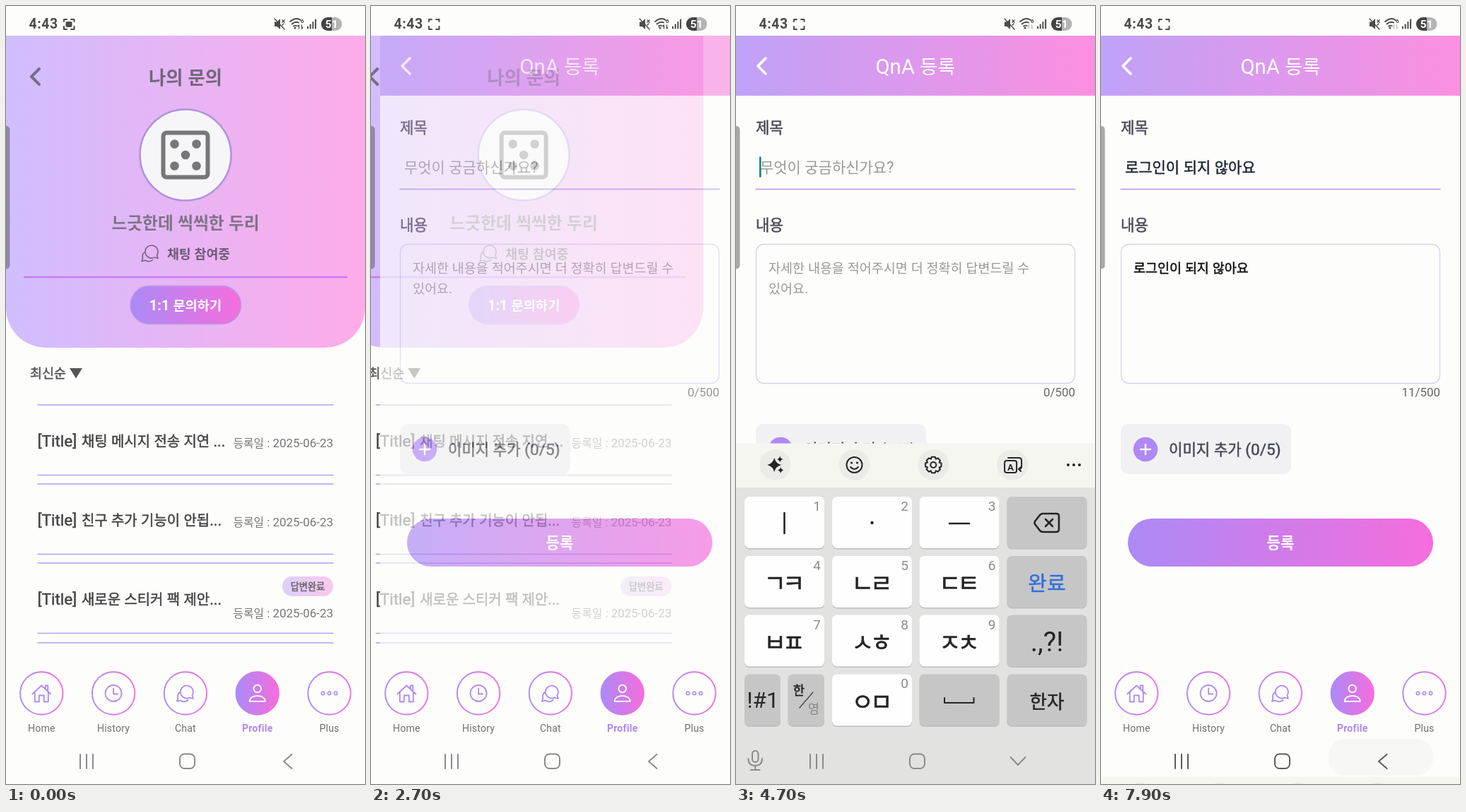
Animation, 508 px wide and 1102 px high, one loop 8000 ms. Source, as an HTML page:

```html
<!DOCTYPE html>
<html lang="ko">
<head>
<meta charset="utf-8">
<title>문의 등록</title>
<style>
html, body { margin: 0; width: 100%; height: 100%; overflow: hidden; background: #fdfdfc; }
svg { display: block; width: 100%; height: 100%; }
text { font-family: Roboto, "Noto Sans CJK KR", "Noto Sans CJK JP", sans-serif; white-space: pre; stroke-width: 0; }
.hangul { font-size: .935em; }
.medium { stroke-width: .5; }
.jamo { stroke-width: .6; letter-spacing: -5px; }
.line { fill: none; stroke-linecap: round; stroke-linejoin: round; }
</style>
</head>
<body>
<svg id="stage" viewBox="0 0 508 1102"></svg>
<script>
const LOOP = 8000;
const PAPER = '#fdfdfc', VIOLET = '#b088f4', MESSAGE = '로그인이 되지 않아요';

// Markup helpers
const text = (x, y, size, content, fill = '#555', extra = '') =>
  `<text x="${x}" y="${y}" font-size="${size}" fill="${fill}" stroke="${fill}" ${extra}>${
    content.replace(/[ㄱ-ㅣ가-힣]+/g, run => `<tspan class="hangul">${run}</tspan>`)}</text>`;
const MID = 'text-anchor="middle"', END = 'text-anchor="end"';
const BOLD = 'font-weight="700"', MEDIUM = 'class="medium"';
const rect = (x, y, w, h, r, fill, extra = '') =>
  `<rect x="${x}" y="${y}" width="${w}" height="${h}" rx="${r}" fill="${fill}" ${extra}/>`;
const circle = (x, y, r, fill, extra = '') => `<circle cx="${x}" cy="${y}" r="${r}" fill="${fill}" ${extra}/>`;
const line = (d, stroke, width = 2, extra = '') =>
  `<path class="line" d="${d}" stroke="${stroke}" stroke-width="${width}" ${extra}/>`;
const group = (content, id = '', x = 0, y = 0) =>
  `<g ${id && `id="${id}"`} transform="translate(${x} ${y})">${content}</g>`;
const gradient = (id, from, to) => `<linearGradient id="${id}">
  <stop stop-color="${from}"/><stop offset="1" stop-color="${to}"/></linearGradient>`;

const CHAT = 'M11 7.5L6 6.1A9 9 0 1 1 9.6 2.8Z' +
  'M-8.5 -1A8 8 0 0 0 -10.5 7L-12 11.5L-7 10.2A8 8 0 0 0 3.5 9.5';

function inquiryList() {
  const dots = [[-15.5, -15.5], [15.5, -15.5], [0, 0], [-15.5, 15.5], [15.5, 15.5]];
  const rows = ['채팅 메시지 전송 지연 ...', '친구 추가 기능이 안됩...', '새로운 스티커 팩 제안...'];
  return rect(0, 42, 508, 1060, 0, PAPER) +
    '<path d="M0 42H508V427.5A56.4 56.4 0 0 1 451.6 483.9H56.4A56.4 56.4 0 0 1 0 427.5Z" fill="url(#soft)"/>' +
    line('M47 89L36 100L47 111', '#786c88', 4) +
    text(254, 111, 28.2, '나의 문의', '#716779', `${MID} ${BOLD}`) +
    circle(254, 211, 64.5, '#f6f6f9', 'stroke="#b092de" stroke-width="2.6"') +
    rect(222.5, 179.5, 63, 63, 5, 'none', 'stroke="#777" stroke-width="6"') +
    dots.map(([x, y]) => circle(254 + x, 211 + y, 6.3, '#777')).join('') +
    text(254, 316, 25.4, '느긋한데 씩씩한 두리', '#7d7386', `${MID} ${BOLD}`) +
    group(line(CHAT, '#75627f', 1.6), '', 204, 350) +
    text(228, 358, 19.6, '채팅 참여중', '#6d5c76', BOLD) +
    line('M26 384H482', '#c87af6', 2.4) +
    rect(176, 396.5, 156.5, 54, 27, 'url(#strong)', 'stroke="#bb97e6" stroke-width="1.4"') +
    text(254, 431, 20, '1:1 문의하기', '#fff', `${MID} ${BOLD}`) +
    text(34, 527, 19.76, '최신순', '#555', MEDIUM) +
    '<path d="M90 513H108L99 527.5Z" fill="#555"/>' +
    rows.map((title, i) => {
      const top = 565 + 112 * i, answered = i === 2;
      return line(`M45 ${top}H463M45 ${top + 99.5}H463`, '#b3a0f3', 1.4) +
        text(44.5, top + 59, 22.6, '[Title]', '#444', MEDIUM) +
        text(107, top + 59, 21.35, title, '#444', MEDIUM) +
        text(463, top + (answered ? 76.5 : 60), 16.93, '등록일 : 2025-06-23', '#777', END);
    }).join('') +
    line('M45 902H463', '#b3a0f3', 1.4) +
    rect(391, 808, 72, 28, 14, 'url(#badge)') +
    text(427, 827, 14.1, '답변완료', '#666', `${MID} ${MEDIUM}`);
}

function questionForm() {
  return rect(0, 42, 508, 1060, 0, PAPER) +
    rect(0, 42, 508, 85, 0, 'url(#header)') +
    line('M42 74L31 85L42 96', '#fff', 3.6) +
    text(254, 96, 29.3, 'QnA 등록', '#fff', MID) +
    text(28, 180, 22.58, '제목', '#4a4a55', MEDIUM) +
    text(34, 236, 22.4, '무엇이 궁금하신가요?', '#999', 'id="titleHint"') +
    text(34, 236, 22.4, MESSAGE, '#1f2937', `id="titleText" ${MEDIUM}`) +
    line('M28 259.5H480', '#b395f0', 1.6) +
    text(28, 318, 22.58, '내용', '#4a4a55', MEDIUM) +
    rect(28.5, 337.5, 451, 197, 11, 'none', 'stroke="#d9d1ee" stroke-width="1.3"') +
    `<g id="bodyHint">${text(46, 378, 19.76, '자세한 내용을 적어주시면 더 정확히 답변드릴 수', '#999')}
      ${text(46, 407, 19.76, '있어요.', '#999')}</g>` +
    text(46, 378, 19.76, MESSAGE, '#111', `id="bodyText" ${MEDIUM}`) +
    text(480, 553, 16.93, '', '#666', `id="counter" ${END}`) +
    rect(28, 592, 241, 71, 11, '#f1f1f3') +
    circle(63, 628, 17.3, VIOLET) + line('M56 628H70M63 621V635', '#fff', 2.4) +
    text(96, 636, 22.58, '이미지 추가 (0/5)', '#454a55', MEDIUM) +
    rect(38, 726, 432, 68, 34, 'url(#strong)') +
    text(254, 768, 22.58, '등록', '#fff', `${MID} ${BOLD}`) +
    rect(0, 0, 2.6, 29, 0, '#148571', 'id="caret"');
}

function tabBar() {
  const icons = [
    ['Home', c => line('M-13 1L0 -11L13 1M-9.5 -2V12H-3.5V3H3.5V12H9.5V-2M5.5 -7V-11H9V-4', c, 1.8)],
    ['History', c => circle(0, 0, 11.5, 'none', `stroke="${c}" stroke-width="1.8"`) + line('M0 -7V1H6', c, 1.8)],
    ['Chat', c => line(CHAT, c, 1.8)],
    ['Profile', c => circle(0, -6.5, 5.3, 'none', `stroke="${c}" stroke-width="1.8"`) +
      line('M-11 11.5C-11 1 11 1 11 11.5Z', c, 1.8)],
    ['Plus', c => [-9, 0, 9].map(x => circle(x, 0, 2.2, 'none', `stroke="${c}" stroke-width="1.6"`)).join('')],
  ];
  return rect(0, 910, 508, 192, 0, PAPER) + icons.map(([label, icon], i) => {
    const active = label === 'Profile';
    return group(
      circle(0, 0, 30.2, active ? 'url(#strong)' : 'none', 'stroke="url(#strong)" stroke-width="1.9"') +
      icon(active ? '#fff' : VIOLET) +
      text(0, 54.5, 14.1, label, active ? VIOLET : '#707070',
        `${MID} letter-spacing=".2" ${active ? BOLD : ''}`), '', 50.3 + 101.8 * i, 973.5);
  }).join('');
}

function keyboard() {
  const INK = '#252525';
  const columns = [12, 136, 259.5, 383.5], rows = [695, 779, 862.5, 946.5];
  const key = (x, y, w, fill) => rect(x, y + 1.5, w, 73, 7, '#bdbdbd') + rect(x, y, w, 73, 7, fill);
  const label = (col, row, size, content, fill = INK, extra = '') =>
    text(columns[col] + 56.5, rows[row] + 37.5 + size * .37, size, content, fill, `${MID} ${extra}`);
  const JAMO = 'class="jamo" dx="-2.5"';
  const jamo = ['', '', '', 'ㄱㅋ', 'ㄴㄹ', 'ㄷㅌ', 'ㅂㅍ', 'ㅅㅎ', 'ㅈㅊ'];
  const letterKeys = jamo.map((content, i) => {
    const col = i % 3, row = Math.floor(i / 3);
    return key(columns[col], rows[row], 113, '#fefefe') + label(col, row, 36.5, content, INK, JAMO) +
      text(columns[col] + 108, rows[row] + 20, 19, String(i + 1), '#8c8c8c', END);
  }).join('');
  const gear = Array.from({ length: 8 }, (_, i) => {
    const at = (r, a) => `${(r * Math.cos(a)).toFixed(1)} ${(r * Math.sin(a)).toFixed(1)}`;
    const a = i * Math.PI / 4;
    return `${i ? 'L' : 'M'}${at(11.5, a - .22)}L${at(11.5, a + .22)}L${at(9, a + .4)}`;
  }).join('') + 'Z';
  const spark = (x, y, r) => `<path fill="${INK}" d="M${x} ${y - r}Q${x + r * .2} ${y - r * .2} ${x + r} ${y}` +
    `Q${x + r * .2} ${y + r * .2} ${x} ${y + r}Q${x - r * .2} ${y + r * .2} ${x - r} ${y}` +
    `Q${x - r * .2} ${y - r * .2} ${x} ${y - r}Z"/>`;
  const tools = [
    spark(-1.5, 0, 10) + spark(6.5, -8, 4.5) + spark(7.5, 7.5, 4.5),
    circle(0, 0, 11, 'none', `stroke="${INK}" stroke-width="2"`) + circle(-4, -3, 1.6, INK) +
      circle(4, -3, 1.6, INK) + line('M-5.5 3Q0 9 5.5 3', INK),
    line(gear, INK) + circle(0, 0, 4, 'none', `stroke="${INK}" stroke-width="2"`),
    rect(-11, -6, 17, 17, 3, 'none', `stroke="${INK}" stroke-width="2"`) +
      line('M-6 -10H9Q13 -10 13 -6V2Q13 6 9 6', INK) + line('M12 3L9 6L12 9', INK) +
      text(-2.5, 7.5, 13.5, 'A', INK, `${MID} ${BOLD}`),
  ];
  return rect(0, 619.5, 508, 490, 0, '#f6f6f1') + rect(0, 682, 508, 430, 0, '#e2e2e1') +
    tools.map((tool, i) => group(circle(0, 0, 22, '#ebebe8') + tool, '', 55.7 + 111.8 * i, 650)).join('') +
    [470, 478, 486].map(x => circle(x, 650, 2, INK)).join('') +
    letterKeys +
    line('M68.5 718V747', INK, 2.6) + circle(192.5, 732, 2.2, INK) + line('M302 733H330', INK, 2.6) +
    rows.map(y => key(columns[3], y, 113, '#c6c6c6')).join('') +
    line('M434 719H453Q457 719 457 723V741Q457 745 453 745H434Q432 745 430 743L423 734Q422 732 423 730L430 721Q432 719 434 719Z', INK, 2.6) +
    line('M438 727L448 737M448 727L438 737', INK, 2.6) +
    `<g id="doneKey">${label(3, 1, 31, '완료', '#3270dc', MEDIUM)}</g>` +
    line('M457 802V808Q457 822 444 822H424M432 814L424 822L432 830', INK, 2.5, 'id="enterKey"') +
    label(3, 2, 39, '.,?!') + label(3, 3, 28.5, '한자', INK, MEDIUM) +
    key(12, rows[3], 51, '#c6c6c6') + text(38, 994, 31.5, '!#1', INK, MID) +
    key(73.5, rows[3], 51.5, '#c6c6c6') + text(89, 976, 19, '한', INK, `${MID} ${MEDIUM}`) +
    text(110, 1002, 19, '영', '#858585', MID) + line('M90 994L109 972', '#444', 1.3) +
    key(136, rows[3], 113, '#fefefe') + label(1, 3, 36.5, 'ㅇㅁ', INK, JAMO) +
    text(244, 966, 19, '0', '#8c8c8c', END) +
    key(259.5, rows[3], 113, '#c6c6c6') + line('M295 980V987H336.5V980', INK, 2);
}

function statusBar() {
  const INK = '#4b4b4b', bars = [4, 7, 10.5, 14];
  return rect(0, 0, 508, 42, 0, PAPER) +
    text(32.5, 32.3, 19.4, '4:43', INK, `${BOLD} letter-spacing=".6"`) +
    line('M82 22V19H86M92 19H96.5V22M96.5 29V33H92M86 33H82V29', INK, 2) +
    rect(84.5, 22, 9, 8, 2, INK, 'id="camera"') +
    `<path d="M380 22.5H383.5L388 18V33L383.5 29H380Z" fill="${INK}"/>` +
    line('M380 18L394 33M391 20L394 23M394 20L391 23M391 27L393 25', INK, 1.5) +
    line('M402 22Q410.5 15 417 20M404.5 25.5Q409.5 21.5 414 23.5M407 28.5Q409.5 27 411.5 28', INK, 1.9) +
    circle(409, 31, 1.6, INK) + text(417, 24, 8, '6', INK, BOLD) +
    line('M414.5 32V27L413 28.5M418.5 27V32L420 30.5', INK, 1.3, 'id="traffic"') +
    bars.map((h, i) => rect(426 + 3.7 * i, 32.5 - h, 2, h, .8, INK)).join('') +
    rect(446, 16, 29.5, 19, 9.5, '#b4b4b4') +
    `<path d="M461 16H455.5A9.5 9.5 0 0 0 455.5 35H461Z" fill="#444"/>` +
    text(460.7, 31, 15.5, '51', '#fff', `${MID} ${BOLD}`);
}

function navigationBar() {
  return rect(322, 1038, 148, 52, 24, '#f7f7f6', 'id="backGlow"') +
    `<g id="navIcons" stroke="#8b8b8b">` +
    line('M105 1060V1080M114 1060V1080M123 1060V1080', 'inherit') +
    rect(246, 1059.5, 21, 20.5, 6.5, 'none', 'stroke-width="2"') +
    line('M404.5 1060L393 1070L404.5 1080', 'inherit', 2, 'id="backIcon"') +
    line('M388.5 1064L399 1075L409.5 1064', 'inherit', 2, 'id="hideIcon"') +
    `<g id="mic">${rect(23, 1055, 8.5, 16, 4.2, 'none', 'stroke-width="2"')}
      ${line('M17.5 1066Q17.5 1076 27.2 1076Q37 1076 37 1066M27.2 1076V1082M21 1082H33.5', 'inherit')}</g></g>`;
}

const stage = document.getElementById('stage');
stage.innerHTML = `<defs>
  ${gradient('soft', '#d0beff', '#ffabe9')}${gradient('strong', '#ab8af6', '#f66ddd')}
  ${gradient('header', '#bfa2f8', '#fc8fe0')}${gradient('badge', '#dccffa', '#f8c9ee')}</defs>` +
  group(inquiryList(), 'list') + group(questionForm(), 'form') + tabBar() + group(keyboard(), 'keys') +
  navigationBar() + statusBar() + rect(-6, 170, 11.5, 202.5, 5, '#555', 'opacity=".5"');

const ui = Object.fromEntries([...stage.querySelectorAll('[id]')].map(el => [el.id, el]));
const show = (el, visible) => el.setAttribute('visibility', visible ? 'inherit' : 'hidden');
const move = (el, x, y) => el.setAttribute('transform', `translate(${x} ${y})`);
const progress = (t, start, duration) => Math.min(1, Math.max(0, (t - start) / duration));
const easeOut = p => 1 - (1 - p) ** 3;

// Fast start with a very long settle: two joined Bezier segments, solved for x.
function extraSlowIn(x) {
  const [xs, ys] = x < 1 / 6
    ? [[0, .05, .1333, .1667], [0, 0, .06, .4]]
    : [[.1667, .2083, .25, 1], [.4, .82, 1, 1]];
  const bezier = ([a, b, c, d], s) =>
    a * (1 - s) ** 3 + 3 * b * s * (1 - s) ** 2 + 3 * c * s * s * (1 - s) + d * s ** 3;
  let low = 0, high = 1;
  for (let i = 0; i < 20; i++) {
    const middle = (low + high) / 2;
    if (bezier(xs, middle) < x) low = middle; else high = middle;
  }
  return bezier(ys, (low + high) / 2);
}

const OPEN = 2595, TITLE_FOCUS = 4350, TITLE_FILLED = 5000, BODY_FOCUS = 6450, BODY_FILLED = 7000, CLOSE = 7650;

function render(t) {
  const slide = 50.8 * extraSlowIn(progress(t, OPEN, 450));
  move(ui.list, -slide, 0);
  move(ui.form, 50.8 - slide, 0);
  ui.form.setAttribute('opacity', progress(t, OPEN + 50, 83));

  const typing = t >= TITLE_FOCUS && t < CLOSE;
  const raised = easeOut(progress(t, TITLE_FOCUS, 300)) - easeOut(progress(t, CLOSE, 350));
  move(ui.keys, 0, 483 * (1 - raised));
  show(ui.keys, raised > 0);
  show(ui.mic, typing);
  show(ui.hideIcon, typing);
  show(ui.backIcon, !typing);
  show(ui.backGlow, t >= CLOSE);
  ui.navIcons.setAttribute('stroke', t >= CLOSE ? '#5c5c5c' : '#8b8b8b');

  const titleFilled = t >= TITLE_FILLED, inBody = t >= BODY_FOCUS, bodyFilled = t >= BODY_FILLED;
  show(ui.titleHint, !titleFilled);
  show(ui.titleText, titleFilled);
  show(ui.bodyHint, !bodyFilled);
  show(ui.bodyText, bodyFilled);
  show(ui.doneKey, !inBody);
  show(ui.enterKey, inBody);
  ui.counter.textContent = bodyFilled ? '11/500' : '0/500';

  const lastEdit = [BODY_FILLED, BODY_FOCUS, TITLE_FILLED, TITLE_FOCUS].find(time => t >= time);
  show(ui.caret, typing && Math.floor((t - lastEdit) / 500) % 2 === 0);
  if (inBody) move(ui.caret, bodyFilled ? 208 : 45, 356);
  else move(ui.caret, titleFilled ? 219 : 33, 213.5);

  show(ui.camera, Math.floor(t / 500) % 2 === 0);
  ui.traffic.setAttribute('opacity', t < TITLE_FOCUS ? 1 : .35);
}

const start = performance.now();
function tick() {
  render((performance.now() - start) % LOOP);
  requestAnimationFrame(tick);
}
tick();
</script>
</body>
</html>
```
